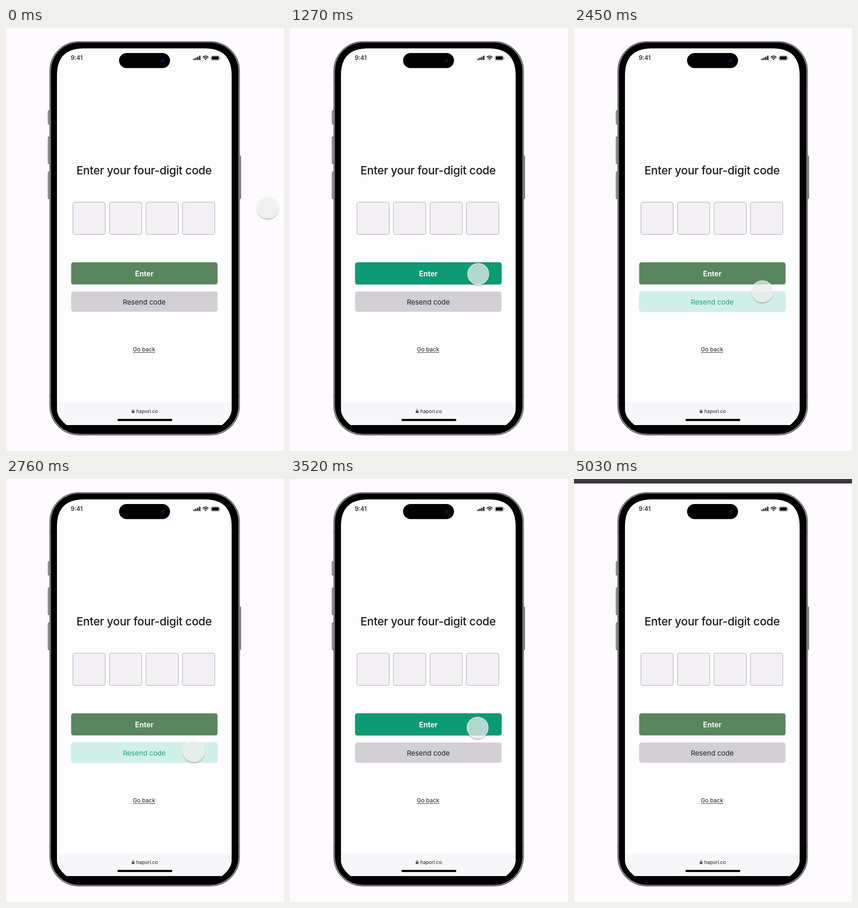
An HTML page for the animation above (5180 ms loop, 600 by 913 pixels).

```html
<!DOCTYPE html>
<html lang="en">
<head>
<meta charset="utf-8">
<title>Enter code</title>
<style>
  html, body { margin: 0; width: 100%; height: 100%; overflow: hidden; background: #fdfbfe; }
  svg { display: block; width: 100%; height: 100%; }
  text { font-family: Inter, "Open Sans", sans-serif; fill: #1b1b1d; text-anchor: middle; }

  .cursor, .hover, .topbar { animation: 5180ms linear infinite; }
  .cursor { animation-name: move; }
  .hover { opacity: 0; animation-timing-function: step-end; }
  .enter { animation-name: enter-hover; }
  .resend { animation-name: resend-hover; }
  .topbar { animation-name: slide-in; animation-timing-function: step-end; }

  @keyframes move {
    0%, .3% { transform: translate(565px, 387.5px); }
    11.2% { transform: translate(482px, 426px); }
    15.25% { transform: translate(443.5px, 443px); animation-timing-function: ease-out; }
    21.62% { transform: translate(410px, 531px); animation-timing-function: ease-out; }
    29.34%, 31.8% { transform: translate(403px, 531px); }
    34.56% { transform: translate(403.5px, 556px); animation-timing-function: ease-out; }
    42.66%, 45% { transform: translate(402.5px, 590px); }
    47.3% { transform: translate(406.5px, 568.5px); animation-timing-function: ease-out; }
    50% { transform: translate(406px, 534px); animation-timing-function: ease-in-out; }
    54.6% { transform: translate(405px, 598px); animation-timing-function: ease-out; }
    57.9%, 61.9% { transform: translate(405px, 589px); animation-timing-function: ease-in-out; }
    69.7%, 73.9% { transform: translate(405px, 531px); animation-timing-function: ease-in; opacity: 1; }
    78.3% { transform: translate(628px, 352px); opacity: 1; }
    78.31%, 100% { transform: translate(660px, 340px); opacity: 0; }
  }
  @keyframes enter-hover {
    0%, 35.6%, 52%, 77% { opacity: 0; }
    22.2%, 49.4%, 65.8% { opacity: 1; }
  }
  @keyframes resend-hover {
    0%, 48.8%, 65% { opacity: 0; }
    36.6%, 52.6% { opacity: 1; }
  }
  @keyframes slide-in {
    0% { transform: translateY(-12px); }
    95.94% { transform: translateY(-6px); }
    96.52% { transform: translateY(-2px); }
    97.1%, 100% { transform: none; }
  }
</style>
</head>
<body>
<svg viewBox="0 0 600 913" preserveAspectRatio="none">
  <defs>
    <filter id="shadow" x="-30%" y="-30%" width="160%" height="170%">
      <feGaussianBlur stdDeviation="1.8"/>
    </filter>
    <mask id="around">
      <rect x="-40" y="-40" width="80" height="80" fill="#fff"/>
      <circle r="23" fill="#000"/>
    </mask>
    <clipPath id="screen">
      <path d="M168 44H429Q487 44 487 102V822Q487 840 466 857H131Q110 840 110 822V102Q110 44 168 44Z"/>
    </clipPath>
  </defs>

  <!-- phone body -->
  <g fill="#a9a9ad" stroke="#39393c" stroke-width="1">
    <rect x="91" y="178.500" width="3.500" height="29" rx="1"/>
    <rect x="91" y="235" width="3.500" height="58" rx="1"/>
    <rect x="91" y="310.500" width="3.500" height="58" rx="1"/>
    <rect x="503" y="276" width="3.500" height="92.500" rx="1"/>
  </g>
  <rect x="94.500" y="29.500" width="409.500" height="849" rx="63" fill="#a4a4a8" stroke="#48484b" stroke-width="1.300"/>
  <g fill="#77777b">
    <rect x="93.500" y="110" width="4" height="5"/>
    <rect x="500.500" y="110" width="4" height="5"/>
    <rect x="93.500" y="793" width="4" height="5"/>
    <rect x="500.500" y="793" width="4" height="5"/>
    <rect x="185" y="875" width="5" height="4"/>
  </g>
  <rect x="97" y="31.500" width="404.500" height="844.500" rx="60.500" fill="#000" stroke="#2a2a2d"/>

  <!-- screen -->
  <g clip-path="url(#screen)">
    <rect x="110" y="44" width="377" height="814" fill="#fdfcfe"/>
    <rect x="110" y="808" width="377" height="50" fill="#f7f6f8"/>
  </g>
  <rect x="244" y="54" width="110" height="32.500" rx="16.250" fill="#000"/>
  <circle cx="338" cy="70.500" r="5" fill="#0b0b20"/>
  <circle cx="338" cy="70.500" r="2" fill="#1b1b4c"/>

  <!-- status bar -->
  <text x="152.500" y="69" font-size="13" font-weight="500">9:41</text>
  <g fill="#111">
    <rect x="404.500" y="66" width="2.800" height="3.200" rx=".7"/>
    <rect x="408.600" y="64" width="2.800" height="5.200" rx=".7"/>
    <rect x="412.700" y="62" width="2.800" height="7.200" rx=".7"/>
    <rect x="416.800" y="59.700" width="2.800" height="9.500" rx=".7"/>
    <path d="M428.700 67.200Q430.800 65.600 432.900 67.200L430.800 69.400Z"/>
    <rect x="443.800" y="61" width="15.700" height="7.600" rx="1.800"/>
  </g>
  <g fill="none" stroke="#111" stroke-width="1.700">
    <path d="M424.600 63.100Q430.800 57.600 437 63.100"/>
    <path d="M426.700 65.500Q430.800 62 434.900 65.500"/>
  </g>
  <rect x="442.300" y="59.500" width="18.700" height="10.600" rx="3" fill="none" stroke="#a2a2a5"/>
  <path d="M462.400 63.200v3.200" stroke="#a2a2a5" stroke-width="1.200"/>

  <!-- form -->
  <text x="298" y="316" font-size="24.300" font-weight="500" letter-spacing="-.25">Enter your four-digit code</text>
  <g fill="#f3f1f4" stroke="#a6a5a8">
    <rect x="144.500" y="376" width="69.800" height="69.500" rx="4"/>
    <rect x="223.300" y="376" width="69.800" height="69.500" rx="4"/>
    <rect x="302" y="376" width="69.800" height="69.500" rx="4"/>
    <rect x="380.800" y="376" width="69.800" height="69.500" rx="4"/>
  </g>

  <rect x="140.600" y="505.700" width="316" height="47.900" rx="5" fill="#59855f"/>
  <rect class="hover enter" x="140.600" y="505.700" width="316" height="47.900" rx="5" fill="#0d9a74"/>
  <text x="298.500" y="536" font-size="15.400" font-weight="700" style="fill:#fafafa">Enter</text>

  <rect x="140.600" y="568.700" width="316" height="43.800" rx="5" fill="#d2d0d3"/>
  <text x="298.500" y="597" font-size="15">Resend code</text>
  <g class="hover resend">
    <rect x="140.600" y="568.700" width="316" height="43.800" rx="5" fill="#d1f0e8"/>
    <text x="298.500" y="597" font-size="15" style="fill:#1aa37c">Resend code</text>
  </g>

  <text x="298" y="698" font-size="12.300">Go back</text>
  <path d="M274 700.500H322" stroke="#333"/>

  <!-- address bar -->
  <rect x="271.300" y="826" width="6" height="5" rx=".8" fill="#555"/>
  <path d="M272.600 826v-1.300a1.700 1.700 0 0 1 3.400 0v1.300" fill="none" stroke="#555"/>
  <text x="304.500" y="830.500" font-size="10.400">hapori.co</text>
  <rect x="240.500" y="843.800" width="118.500" height="4.400" rx="2.200" fill="#000"/>

  <g class="cursor">
    <g mask="url(#around)">
      <circle cy="2.800" r="23" fill="#000" opacity=".28" filter="url(#shadow)"/>
    </g>
    <circle r="22.900" fill="#ececec" fill-opacity=".74" stroke="#fafafa" stroke-opacity=".85" stroke-width="1.400"/>
  </g>

  <g class="topbar">
    <rect y="-3" width="600" height="12" fill="#3a383b"/>
    <rect y="8" width="600" height="1.500" fill="#1d1c1e"/>
  </g>
</svg>
</body>
</html>
```
